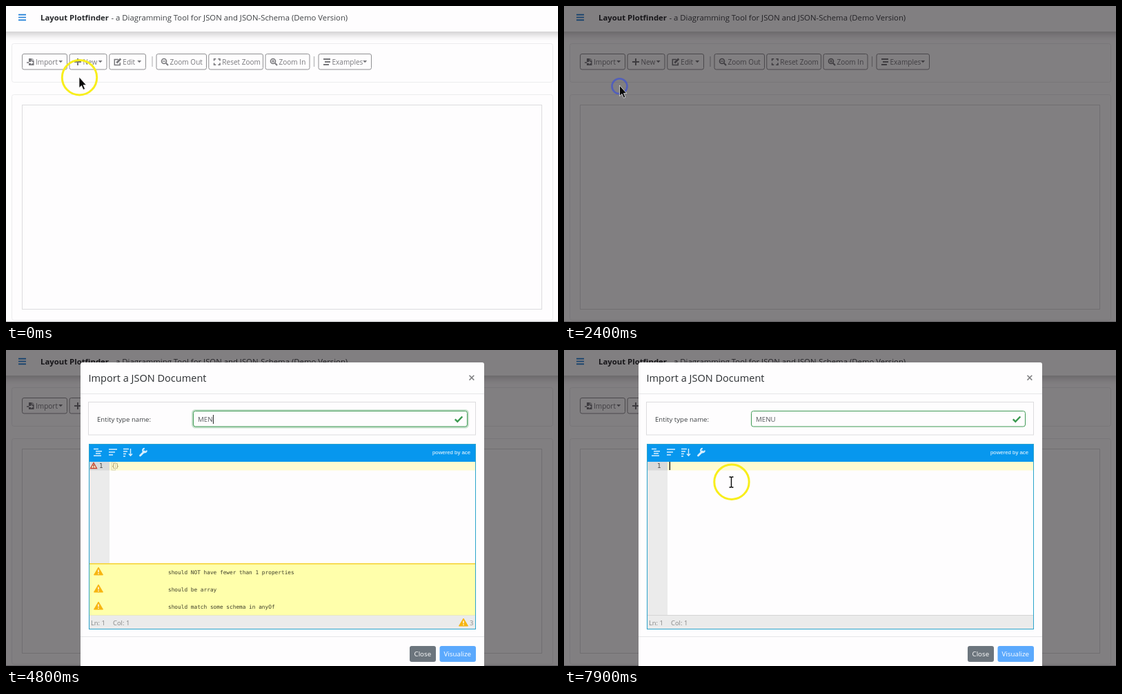
Animation of 800 by 458 pixels, one loop 8000 ms. Source, as an HTML page:

```html
<!DOCTYPE html>
<html lang="en">
<head>
<meta charset="utf-8">
<title>JSON diagramming demo</title>
<style>
  html, body { margin: 0; width: 100%; height: 100%; overflow: hidden; background: #fefdfe; }
  svg { display: block; width: 800px; height: 458px; font-family: "Open Sans", "Noto Sans", sans-serif; }
  .mono { font-family: "DejaVu Sans Mono", monospace; }
  .navbar { filter: drop-shadow(0 5px 5px rgba(0, 0, 0, .18)); }
  .glow { fill: none; stroke-width: 3; stroke-opacity: .28; }
</style>
</head>
<body>
<svg id="stage" viewBox="0 0 800 458"></svg>
<script>
const LOOP = 8000, STEP = 100;

const rect = (x, y, w, h, attrs = '') =>
  `<rect x="${x}" y="${y}" width="${w}" height="${h}" ${attrs}/>`;
const text = (x, y, size, str, attrs = '') =>
  `<text x="${x}" y="${y}" font-size="${size}" ${attrs}>${str}</text>`;
const line = (d, width = 1.5, attrs = '') =>
  `<path d="${d}" fill="none" stroke="currentColor" stroke-width="${width}" ${attrs}/>`;
const shape = (d, fill = 'currentColor', attrs = '') => `<path d="${d}" fill="${fill}" ${attrs}/>`;
const at = (x, y, body) => `<g transform="translate(${x} ${y})">${body}</g>`;
const group = (id, body, attrs = '') => `<g id="${id}" ${attrs}>${body}</g>`;

// Icons are centred on the origin.
const lens = line('M2 2L5 5', 2) + '<circle cx="-1" cy="-1" r="3.5" fill="none" stroke="currentColor" stroke-width="1.6"/>';
const icons = {
  load: shape('M-2.5-5H2V-2H5V5H-2.5V2H1V4L4 1L1-2V0H-2.5Z') + line('M-5.5 1H-2', 1.5) + shape('M2.8-5L5-2.8H2.8Z'),
  plus: line('M-5 0H5M0-5V5', 2),
  edit: line('M1-3.5H-4.5V4.5H3.5V1', 1.5) + line('M-1.5 1.5L4.5-4.5', 2.6),
  zoomOut: lens + line('M-3-1H1', 1.2),
  zoomIn: lens + line('M-3-1H1M-1-3V1', 1.2),
  expand: line('M-4.2-1.5V-4.2H-1.5M1.5-4.2H4.2V-1.5M4.2 1.5V4.2H1.5M-1.5 4.2H-4.2V1.5', 1.6),
  list: line('M-5-4H5M-3 0H5M-5 4H3', 1.8),
  warn: shape('M0-5.5L6.5 5.5H-6.5Z', '#f7b512', 'stroke="#f7b512" stroke-linejoin="round"') +
    line('M0-2V1.8M0 3V4.4', 1.4, 'style="color:#fff"'),
};

function button(id, x, right, icon, label, caret = true) {
  return group(id,
    rect(x - .5, 69.5, right - x, 22.5, 'class="face" rx="2.5" fill="none" stroke="#8f8f92"') +
    at(x + 11.5, 81, icons[icon]) + text(x + 19, 84.5, 10.05, label, 'fill="currentColor"') +
    (caret ? shape(`M${right - 12.8} 79h6l-3 3.2z`) : ''), 'color="#77777b"');
}

function page() {
  const card = (y, h) => rect(8.5, y + .5, 784, h, 'rx="3" fill="none" stroke="#ececee"');
  return rect(0, 0, 800, 458, 'fill="#fefdfe"') +
    rect(-20, -20, 840, 57, 'class="navbar" fill="#fefdfe"') +
    card(54, 56) + card(128, 327) +
    rect(23.5, 143.5, 753, 296, 'fill="none" stroke="#dcdcde"') +
    rect(0, 457, 800, 1, 'fill="#b5b5b7"') +
    line('M18 12.7H29M18 16.5H29M18 20.3H29', 1.7, 'color="#1c7ed6"') +
    text(50, 21, 11.35, 'Layout Plotfinder', 'font-weight="700" fill="#26282b"') +
    text(152.5, 21, 11.35, '- a Diagramming Tool for JSON and JSON-Schema (Demo Version)', 'fill="#3f4245"') +
    button('import', 24, 89, 'load', 'Import') +
    button('new', 92.5, 146.5, 'plus', 'New') +
    button('edit', 150.3, 203, 'edit', 'Edit') +
    button('zoomOut', 218.5, 291, 'zoomOut', 'Zoom Out', false) +
    button('reset', 294.3, 373, 'expand', 'Reset Zoom', false) +
    button('zoomIn', 376.5, 440.5, 'zoomIn', 'Zoom In', false) +
    button('examples', 453.5, 530, 'list', 'Examples') +
    line('M212 73V88M446.5 73V88', 1, 'color="#aaaaad"');
}

function dropdown() {
  const items = ['JSON Document', 'JSON-Schema', 'JSON Diagram', 'Schema Diagram'];
  return group('menu',
    rect(24, 94.5, 138, 108, 'rx="3" fill="#fefdfe" stroke="#c9c9cb"') +
    rect(24.5, 99.5, 137, 22, 'id="menuHover" fill="#f3f4f5"') +
    line('M24 149H162', 1, 'color="#e6e6e8"') +
    items.map((s, i) => text(40, 114 + i * 22 + (i > 1 ? 11 : 0), 9.9, s, 'fill="#33363a"')).join(''));
}

function modal() {
  const form =
    rect(119.5, 75.5, 561, 47.5, 'fill="none" stroke="#dcdcde"') +
    text(132, 104, 9.65, 'Entity type name:', 'fill="#3d4043"') +
    rect(270.5, 87.5, 399, 24.5, 'id="glow" class="glow" rx="4"') +
    rect(271.5, 88.5, 397, 22.5, 'id="input" rx="3" fill="#fefdfe"') +
    text(278, 104, 9.7, '', 'id="value"') +
    rect(278, 94, 1, 13, 'id="caret" fill="#222"') +
    line('M652.8 97L659.2 103.4M659.2 97L652.8 103.4', 2.2, 'id="invalid" color="#cf3a3a"') +
    line('M650.8 100.3L654.3 103.8L661.3 96.5', 2.5, 'id="valid" color="#3a9a50"');
  const toolbar = rect(120, 136, 561, 26, 'fill="#0797ee"') +
    line('M127 143.5H134M130 146.7H139M130 150H137M127 153.2H138', 1.4) +
    line('M149 144H161M149 148H158M149 152H155', 1.6) +
    line('M170 143.5H178M170 147H176M170 150.5H174M170 154H173M180.5 143V152.5M178 150.5L180.5 153.3L183 150.5', 1.4) +
    line('M194.5 153L200.5 147', 2.8, 'stroke-linecap="round"') +
    line('M203.8 145.6A2.8 2.8 0 1 1 200.8 142.8', 2) +
    text(618, 151, 7.8, 'powered by ace',
      'fill="#fff" style="font-family:\'Liberation Sans\',Arial,sans-serif"');
  const status = rect(121, 385, 559, 19, 'fill="#ebebeb"') + line('M121 384.5H680', 1, 'color="#d5d5d5"') +
    text(123, 398.5, 9.4, 'Ln: 1', 'fill="#858585"') + text(155, 398.5, 9.4, 'Col: 1', 'fill="#858585"') +
    group('count', at(663, 394.5, icons.warn) + text(672, 398.5, 9.4, '3', 'fill="#858585"'));
  const editor =
    rect(120.5, 136.5, 560, 268, 'fill="#fefdfe"') +
    rect(121, 162, 29, 242, 'fill="#ebebeb"') + rect(121, 162, 29, 12.5, 'fill="#dadada"') +
    rect(150, 162, 530, 12.5, 'fill="#fffbd1"') +
    text(135, 171.3, 9.1, '1', 'class="mono" fill="#444"') +
    group('lint', shape('M127 163.5L131.5 171.5H122.5Z', '#fff3d0', 'id="lintMark" stroke-width="1.3"') +
      line('M127 166V169M127 169.6V170.8', 1.2, 'color="#8a2a1a"')) +
    group('code', rect(153, 163, 5.5, 11, 'fill="none" stroke="#d8d3b0"') +
      text(153, 171.3, 9.1, '{}', 'class="mono" fill="#9d8d55"')) +
    rect(152.7, 162, 1.3, 12, 'id="editorCaret" fill="#111"') +
    group('status', status) + toolbar +
    rect(120.5, 136.5, 560, 268, 'fill="none" stroke="#2ba4cc"');
  const footer = line('M108 415.5H693', 1, 'color="#e6e6e8"') +
    rect(585, 429, 38, 23, 'rx="3" fill="#6c757d"') + text(591.5, 443.7, 9.75, 'Close', 'fill="#fff"') +
    rect(628.5, 429, 52.5, 23, 'rx="3" fill="#5ba9fd"') + text(634.5, 443.7, 9.8, 'Visualize', 'fill="#fff"');
  const messages = ['should NOT have fewer than 1 properties', 'should be array', 'should match some schema in anyOf'];
  const problems = rect(121, 0, 559, 75.5, 'fill="#ffffab"') + rect(121, 0, 559, 1.6, 'fill="#f5d33a"') +
    messages.map((m, i) => at(134, 11.5 + i * 25, icons.warn) +
      text(235, 15.5 + i * 25, 7.79, m, 'class="mono" fill="#3d3d2a"')).join('');
  return group('modal',
    rect(108, 18, 585, 445, 'rx="3" fill="#fefdfe"') +
    text(119.5, 46, 14.55, 'Import a JSON Document', 'fill="#2b2e31"') +
    line('M671.5 36.8L678.3 43.6M678.3 36.8L671.5 43.6', 1.6, 'color="#808083"') +
    line('M108 63.5H693', 1, 'color="#e6e6e8"') +
    form + footer + editor + group('problems', problems), 'color="#d9efff"');
}

const pointer = '<circle id="halo" cx=".5" cy="-.3" r="25.2" fill="none" stroke="#f8ee1c" stroke-width="3"/>' +
  shape('M0-1V14.5L3.5 11.4L6 17.3L8.5 16.2L6 10.6H10.3Z', '#080808', 'id="arrow" stroke="#fff" stroke-width=".7"') +
  line('M-3-7.5H-1L0-6.5L1-7.5H3M0-6.5V6.5M-3 7.5H-1L0 6.5L1 7.5H3', 1.4, 'id="beam" color="#080808"');

document.getElementById('stage').innerHTML = page() + dropdown() +
  rect(0, 0, 800, 458, 'id="shade" fill="#060306"') + modal() +
  '<circle id="pulse" fill="none" stroke="#3a50d6" stroke-width="2.6"/>' + group('pointer', pointer);

const $ = id => document.getElementById(id);
const set = (id, attrs) => Object.entries(attrs).forEach(([k, v]) => $(id).setAttribute(k, v));
const show = (id, on) => set(id, { visibility: on ? 'inherit' : 'hidden' });
const clamp = v => Math.max(0, Math.min(1, v));
const between = (t, a, b) => t >= a && t < b;

const path = [
  [0, 106, 104], [400, 60, 83], [700, 66, 91], [800, 66, 91], [1300, 80.5, 116], [2400, 80.5, 116],
  [2600, 85, 118], [2900, 150, 108], [3400, 329, 102], [5400, 329, 102], [5900, 186, 172],
  [6200, 177, 170], [6500, 177, 170], [6800, 349, 207], [7000, 349, 207], [7900, 242.5, 191.5],
];
// Each click hides the halo until the given time.
const clicks = [
  { time: 400, until: 700, x: 60, y: 83 },
  { time: 2100, until: 2800, x: 80.5, y: 116.3 },
  { time: 3500, until: 5500, x: 329, y: 101.5 },
  { time: 6200, until: 6700, x: 177, y: 170 },
];
const keyTimes = [4300, 4600, 4800, 5000];

function mouseAt(t) {
  const i = path.findIndex(p => p[0] > t);
  if (i < 0) return path[path.length - 1].slice(1);
  const [a, b] = [path[i - 1], path[i]];
  const u = (t - a[0]) / (b[0] - a[0]), k = u * u * (3 - 2 * u);
  return [a[1] + (b[1] - a[1]) * k, a[2] + (b[2] - a[2]) * k];
}

function drawPointer(t) {
  const [x, y] = mouseAt(t);
  const overText = t > 2900 && ((x > 271 && y < 112) || y > 161);
  const click = clicks.find(c => between(t, c.time, c.until));
  set('pointer', { transform: `translate(${x} ${y})` });
  show('pointer', !between(t, 4300, 5500));
  show('halo', !click);
  show('arrow', !overText);
  show('beam', overText);
  show('pulse', !!click);
  if (!click) return;
  const age = t - click.time;
  set('pulse', {
    cx: click.x, cy: click.y,
    r: 13.3 - 10.4 * Math.exp(-age / 200),
    opacity: clamp((700 - age) / 600),
  });
}

function drawForm(t) {
  const typed = keyTimes.filter(k => t >= k).length;
  const color = typed ? '#3f9a55' : '#cf4450';
  $('value').textContent = typed ? 'MENU'.slice(0, typed) : 'Please enter an entity type name';
  set('value', { fill: typed ? '#55585c' : '#7d8287' });
  set('input', { stroke: color });
  set('glow', { stroke: color });
  show('glow', between(t, 3600, 6200));
  show('caret', between(t, 3600, 5500));
  set('caret', { x: typed ? 278.5 + $('value').getComputedTextLength() : 278 });
  show('invalid', !typed);
  show('valid', typed);
}

function drawEditor(t) {
  const settled = t >= 2800, faulty = t < 6500;
  set('problems', { transform: `translate(0 ${settled ? 309 : 404})` });
  set('lintMark', { stroke: settled ? '#c8402c' : '#b9791f' });
  show('problems', faulty);
  show('lint', faulty);
  show('count', faulty);
  show('status', settled);
  show('code', t < 6400);
  show('editorCaret', t >= 6400);
}

function render(t) {
  const pressed = between(t, 200, 2300);
  set('import', { color: pressed ? '#fff' : '#77777b' });
  $('import').querySelector('.face').setAttribute('fill', pressed ? '#6c757d' : 'none');
  show('menu', between(t, 500, 2200));
  show('menuHover', between(t, 1000, 2200));
  set('shade', { opacity: .5 * clamp((t - 2200) / 200) });

  const rise = 1 - clamp((t - 2400) / 370);
  set('modal', { transform: `translate(0 ${Math.round(-35 * rise * rise)})`, opacity: clamp((t - 2400) / 150) });
  show('modal', t > 2400);
  drawForm(t);
  drawEditor(t);
  drawPointer(t);
}

const start = performance.now();
function tick() {
  const t = (performance.now() - start) % LOOP;
  render(Math.floor(t / STEP) * STEP);
  requestAnimationFrame(tick);
}
tick();
</script>
</body>
</html>
```
